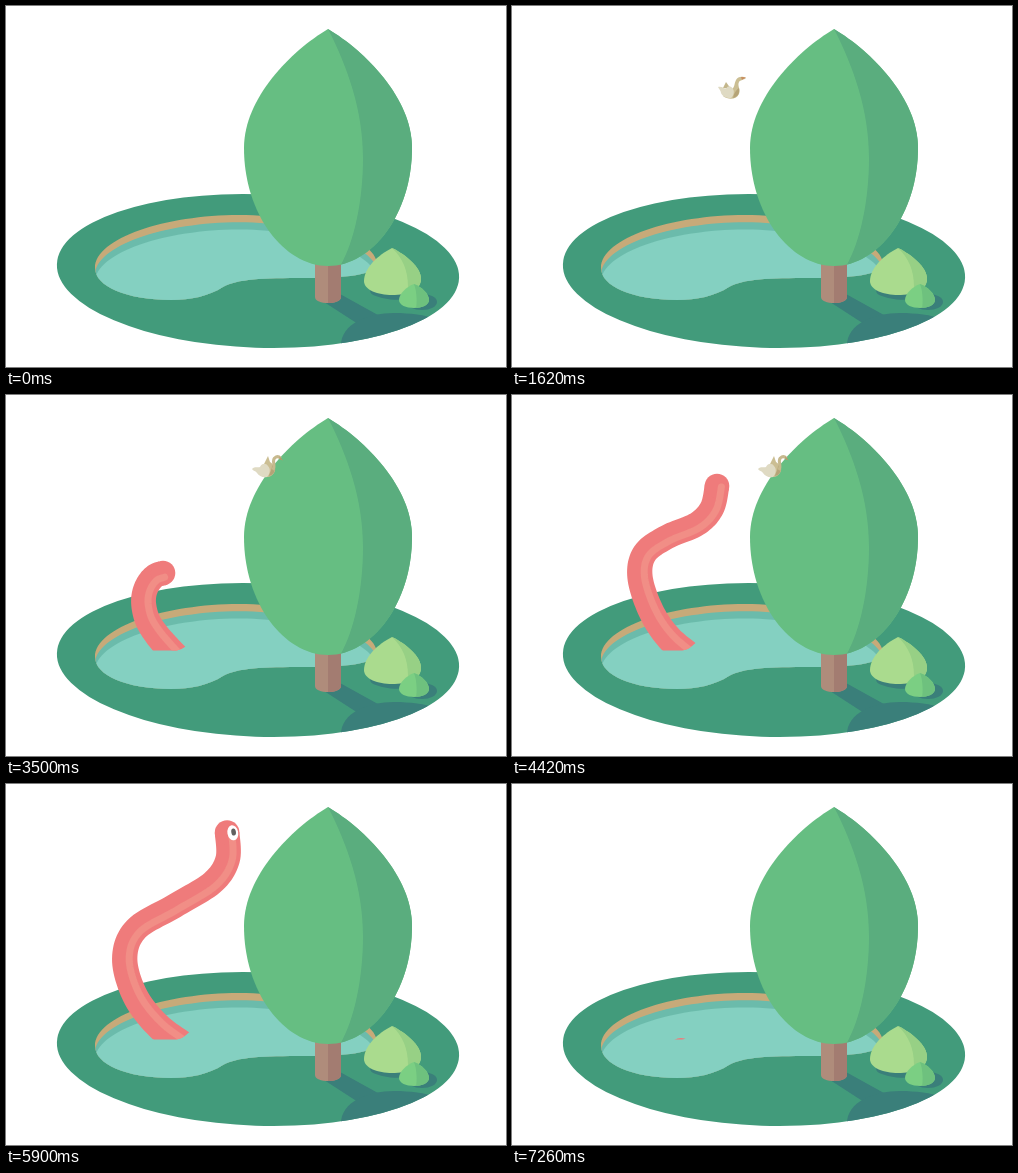
An HTML page with a canvas that plays this animation: 500x361 px, repeating every 7300 ms.

```html
<!DOCTYPE html>
<html lang="en">
<head>
<meta charset="utf-8">
<title>Pond</title>
<style>
  html, body { margin: 0; width: 100%; height: 100%; overflow: hidden; background: #fff; }
  canvas { display: block; width: 500px; height: 361px; }
</style>
</head>
<body>
<canvas id="stage" width="500" height="361"></canvas>
<script>
const ctx = document.getElementById('stage').getContext('2d');
const LOOP = 7300, START = 900, STEP = 40;

const clamp = (v) => Math.max(0, Math.min(1, v));
const mix = (a, b, u) => a + (b - a) * u;
const smooth = (u) => u * u * (3 - 2 * u);
const span = (t, a, b) => clamp((t - a) / (b - a));

function fill(d, color) {
  ctx.fillStyle = color;
  ctx.fill(typeof d === 'string' ? new Path2D(d) : d);
}

function oval(x, y, rx, ry, color, angle = 0) {
  ctx.beginPath();
  ctx.ellipse(x, y, rx, ry, angle, 0, Math.PI * 2);
  ctx.fillStyle = color;
  ctx.fill();
}

// Fills a shape, then its shaded part inside the same outline
function shaded(d, light, shade, dark) {
  const p = new Path2D(d);
  fill(p, light);
  ctx.save();
  ctx.clip(p);
  fill(shade, dark);
  ctx.restore();
}

// ---- Scenery ----
const ground = new Path2D();
ground.ellipse(252, 265, 201.2, 76.7, 0.034, 0, Math.PI * 2);

const pond = new Path2D('M89 262C89 232 160 209 233 209C310 209 369 235 371 257' +
  'C371 267 350 272 300 272C255 272 232 273 217 281C203 290 185 294 165 294C120 294 89 280 89 262Z');

function drawGround() {
  fill(ground, '#429b7b');
  ctx.save();
  ctx.clip(ground);
  fill('M318 296L352 318L372 309L334 288Z', '#3a7f7a');
  fill('M335 342C333 319 360 307 388 307C405 307 418 309 432 313L432 346Z', '#3a7f7a');
  ctx.restore();

  fill(pond, '#c7aa79');
  ctx.save();
  ctx.clip(pond);
  for (const color of ['#6bbbab', '#84d0c1']) {
    ctx.translate(0, 7.2);
    fill(pond, color);
  }
  ctx.restore();
}

function drawPlants() {
  shaded('M309 250H335V291C335 299 309 299 309 291Z', '#af8c7b',
    'M322 250H340V300H322Z', '#a37c71');
  shaded('M322 23C285 45 238 92 238 142C238 208 278 260 322 260C366 260 406 208 406 142C406 92 359 45 322 23Z',
    '#66be82',
    'M322 23C342 62 357 105 357 152C357 195 348 238 333 262L420 262V15H322Z', '#5aad7e');

  oval(385, 287, 21, 6.5, '#3a7f7a', 0.1);
  oval(416, 296, 15, 8, '#3a7f7a');
  shaded('M386 242C372 249 358 262 358 275C358 284 372 289 386 289C402 289 415 284 415 273C415 261 400 249 386 242Z',
    '#aadb8e', 'M386 242C400 255 404 272 401 292H420V240Z', '#97d085');
  shaded('M408 278C400 281 393 288 393 294C393 299 400 302 408 302C416 302 423 299 423 294C423 288 416 281 408 278Z',
    '#7bcf83', 'M408 278C411 286 411 295 410 304H426V276Z', '#6ec17e');
}

// ---- Worm: spine points from below the water up to the head ----
const pose = (...n) => n;
const bud = pose(176,270, 168,260, 160,251, 153,243, 148,235, 146,227, 147,219, 152,214, 159,212);
const hook = pose(176,268, 163,254, 151,240, 142,226, 138,212, 138,200, 142,189, 149,181, 157,178);
const bend = pose(182,264, 157,243, 139,216, 128,182, 133,158, 155,142, 185,129, 200,113, 205,91);
const tall = pose(182,264, 152,242, 128,212, 116,174, 126,145, 165,123, 203,99, 212,72, 201,38);
const reach = pose(182,264, 153,242, 132,212, 125,176, 140,145, 176,120, 214,98, 244,84, 268,73);
const back = pose(168,268, 155,252, 147,232, 145,205, 150,180, 164,156, 180,134, 183,112, 174,82);
const dip = pose(168,272, 165,264, 161,254, 159,246, 159,238, 160,231, 162,224, 165,217, 168,211);
const sunk = dip.map((_, i) => i % 2 ? 274.2 - i * 8 / 17 : 169);

const linear = (u) => u;
const keys = [
  [2780, sunk, linear], [3140, bud, linear], [3500, hook, linear], [3960, bend, smooth],
  [4420, bend, smooth], [4940, tall, smooth], [5480, tall, smooth], [5680, reach, smooth],
  [5760, reach, smooth], [5960, tall, linear], [6260, back, linear], [6940, dip, linear],
  [7260, sunk, linear]
];

function spineAt(t) {
  let i = 1;
  while (i < keys.length - 1 && t > keys[i][0]) i++;
  const [t0, a] = keys[i - 1], [t1, b, ease] = keys[i];
  const u = ease(span(t, t0, t1));
  return a.map((v, k) => mix(v, b[k], u));
}

// Catmull-Rom samples with unit normals
function sample(spine) {
  const count = spine.length / 2 - 1, out = [];
  const at = (i, c) => spine[Math.max(0, Math.min(count, i)) * 2 + c];
  for (let k = 0; k <= count * 12; k++) {
    const i = Math.min(count - 1, Math.floor(k / 12)), u = k / 12 - i;
    const [p, d] = [0, 1].map((c) => {
      const a = at(i - 1, c), b = at(i, c), e = at(i + 1, c), f = at(i + 2, c);
      const q1 = e - a, q2 = 2 * a - 5 * b + 4 * e - f, q3 = 3 * b - a - 3 * e + f;
      return [b + (q1 * u + q2 * u * u + q3 * u * u * u) / 2, q1 + 2 * q2 * u + 3 * q3 * u * u];
    }).reduce((x, y) => [[x[0], y[0]], [x[1], y[1]]]);
    const len = Math.hypot(d[0], d[1]) || 1;
    out.push({ x: p[0], y: p[1], nx: d[1] / len, ny: -d[0] / len, u: k / (count * 12) });
  }
  return out;
}

function drawWorm(t) {
  if (t < keys[0][0] + STEP) return;
  const pts = sample(spineAt(t)), head = pts[pts.length - 1];
  const radius = (p) => 12.3 + 1.5 * Math.pow(1 - p.u, 3);
  const edge = (p, off) => ctx.lineTo(p.x + p.nx * off, p.y + p.ny * off);

  ctx.save();
  ctx.clip(new Path2D('M0 0H500V246H186C180 251 176 255.6 168 255.6H0Z'));
  ctx.beginPath();
  pts.forEach((p) => edge(p, radius(p)));
  pts.slice().reverse().forEach((p) => edge(p, -radius(p)));
  ctx.fillStyle = '#ef7b7b';
  ctx.fill();
  oval(head.x, head.y, 12.3, 12.3, '#ef7b7b');

  if (head.y < 250) {
    ctx.beginPath();
    pts.forEach((p) => edge(p, -4.5));
    ctx.strokeStyle = '#f18e86';
    ctx.lineWidth = 7;
    ctx.lineCap = ctx.lineJoin = 'round';
    ctx.stroke();
  }

  const open = smooth(span(t, 4820, 4980));
  if (open > 0) {
    const x = head.x + 5.7, y = head.y + 0.3;
    oval(x, y, 5.4, 7.6 * open, '#fff', -0.18);
    oval(x + 0.8, y - 0.8, 2.3, 3.6 * open, '#62605f', -0.18);
  }
  ctx.restore();
}

// ---- Bird ----
function flyingBird(t) {
  fill('M-9 8C-4 12 4 12 7 6C9 1 5 -2 7 -6C8 -8 12 -8 14 -10C11 -12 6 -12 4 -8C2 -4 3 -1 0 1Z', '#cbbe93');
  fill('M1 10C5 9 8 6 7 0C4 2 2 5 1 10Z', '#b5a377');
  fill('M9 -11L14 -10.5L10 -8.2Z', '#c98a5b');
  ctx.save();
  ctx.translate(1, 4);
  ctx.rotate(0.3 * Math.sin((1620 - t) / 60));
  fill('M-2 -3L-7 -10L-10 -4Z', '#c3b68b');
  fill('M-15 -5C-11 -6 -9 -3 -7 -3C-5 -7 -2 -6 0 -3C2 0 0 5 -2 6C-7 6 -11 4 -12 1C-12 -1 -14 -3 -15 -5Z', '#dfdac3');
  ctx.restore();
}

function perchedBird(t) {
  fill('M-6 8C0 12 7 10 9 4C10 0 7 -3 4 -5L2 -11L-2 -3Z', '#cbbe93');
  fill('M3 9C7 8 9 5 9 1L6 -2C6 3 4 5 3 9Z', '#b5a377');
  ctx.save();
  ctx.translate(8, 1);
  ctx.rotate(0.06 * Math.sin(t / 130) - 0.18 * smooth(span(t, 4700, 4900)));
  ctx.beginPath();
  ctx.moveTo(-1, 2);
  ctx.bezierCurveTo(2, -3, -3, -6, 0, -10);
  ctx.quadraticCurveTo(3, -13, 6, -10);
  ctx.strokeStyle = '#c7b98e';
  ctx.lineWidth = 3;
  ctx.stroke();
  fill('M5 -12L8.5 -8L5 -9Z', '#b9986a');
  ctx.restore();
  fill('M-14 2C-11 -1 -8 1 -6 0C-4 -4 0 -4 2 -1C5 2 4 7 1 10C-3 11 -7 9 -9 6C-10 4 -13 4 -14 2Z', '#dfdac3');
}

function drawBird(t) {
  if (t < START || t >= 5720) return;
  const fly = span(t, START, 1620), land = smooth(span(t, 1620, 2020));
  const x = mix(24, 220, fly) + 40 * land;
  const y = mix(93, 82, fly) - 10 * land + 2 * Math.sin(fly * Math.PI * 4) * (1 - land);
  ctx.save();
  ctx.translate(x, y);
  if (t < 2020) flyingBird(t);
  else perchedBird(t);
  ctx.restore();
}

function render(now) {
  const raw = now % LOOP;
  const t = raw < START ? 0 : START + Math.floor((raw - START) / STEP) * STEP;
  ctx.fillStyle = '#fff';
  ctx.fillRect(0, 0, 500, 361);
  drawGround();
  drawPlants();
  drawBird(t);
  drawWorm(t);
}

const begin = performance.now();
function tick() {
  render(performance.now() - begin);
  requestAnimationFrame(tick);
}
tick();
</script>
</body>
</html>
```
